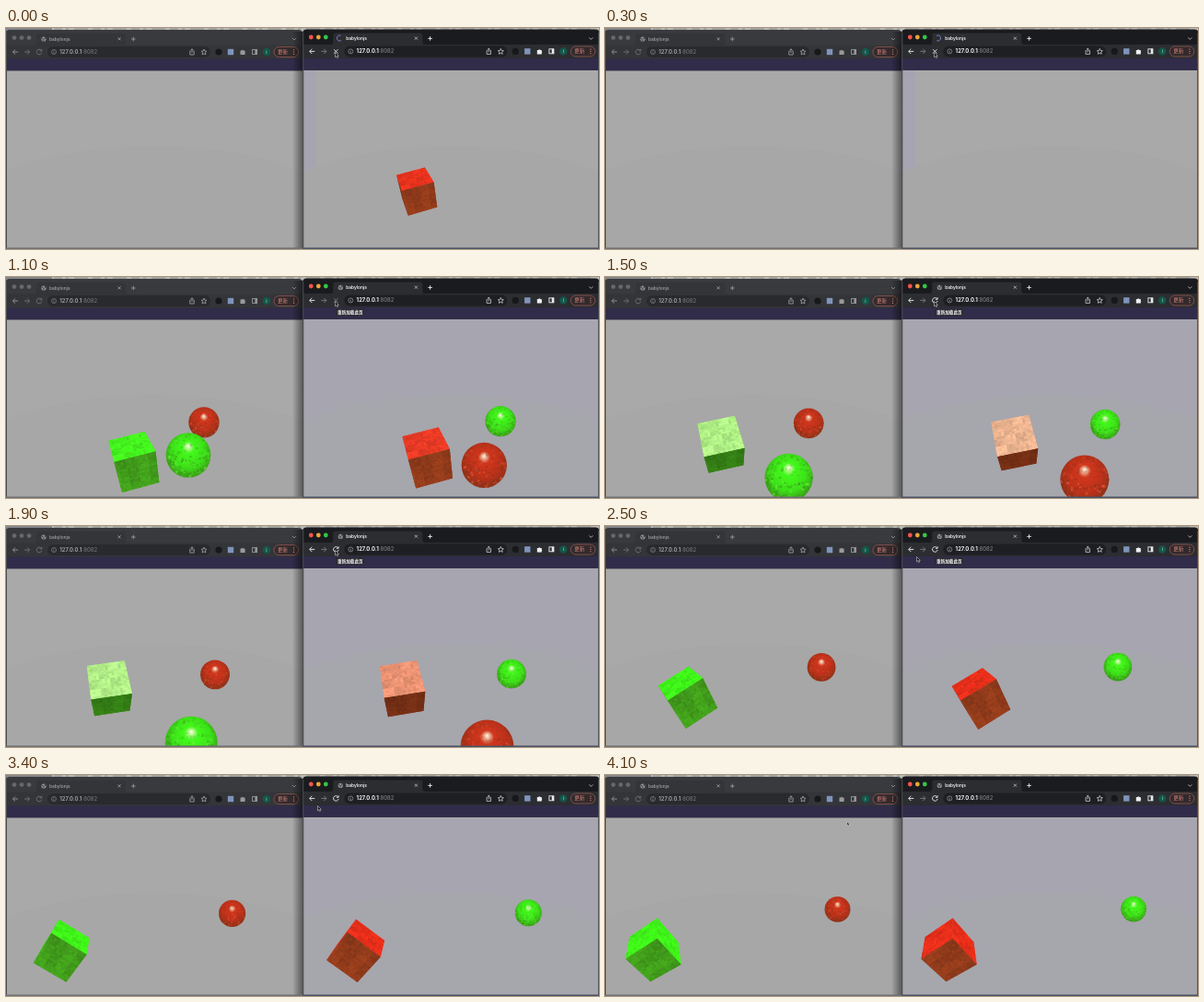
Write an HTML page with a canvas that moves like this. It is 644 by 240 pixels and loops after 4.2 s.

```html
<!DOCTYPE html>
<html lang="zh">
<head>
<meta charset="utf-8">
<title>babylonjs</title>
<style>
html, body { margin: 0; width: 100%; height: 100%; overflow: hidden; background: #a9a9a9; }
canvas, svg { position: absolute; left: 0; top: 0; width: 644px; height: 240px; display: block; }
text { font-family: Inter, "Noto Sans CJK SC", "Noto Sans CJK", sans-serif; }
.hide { display: none; }
</style>
</head>
<body>
<canvas id="scene" width="644" height="240"></canvas>
<svg id="ui" viewBox="0 0 644 240"></svg>
<script>
const LOOP = 4200, STEP = 100;
const $ = id => document.getElementById(id);
const ctx = $('scene').getContext('2d');

// ---------- browser windows ----------
const reload = '<path d="M38.3 24.3A2.8 2.8 0 1 0 38.8 26.6M38.8 22.8V24.9H36.6"/>';

function browser(dx, dy, on) {
  const fg = on ? '#eceef0' : '#98999b', dim = on ? '#7d7f82' : '#727376';
  const icon = on ? '#b9bbbe' : '#98999b';
  const bar = on ? '#2c2d30' : '#343539', strip = on ? '#1a1b1e' : '#393a3e';
  const pill = on ? '#1e1f22' : '#292a2d';
  const lights = on ? ['#f4544d', '#e9a63a', '#35c64a'] : Array(3).fill('#67686b');
  const button = on
    ? `<g id="stop"><path d="M33.8 23.8L38.2 28.2M38.2 23.8L33.8 28.2"/></g><g id="again" stroke="${fg}">${reload}</g>`
    : `<g stroke="${dim}">${reload}</g>`;
  const globe = `<g${on ? ' id="globe"' : ''}><circle cx="41" cy="12" r="2.6" fill="#8f9194"/>
    <path d="M39 11.2L41.2 12.4L40.6 14M42.3 10L42.6 12" stroke="${bar}"/></g>`;
  return `<g transform="translate(${dx} ${dy})" fill="none" stroke-width=".9">
    <path d="M0 46.3V6Q0 2 4 2H318Q322 2 322 6V46.3Z" fill="${strip}"/>
    <path d="M31 19Q33 18 33 15V8Q33 6 36 6H127Q130 6 130 8V15Q130 18 132 19Z" fill="${bar}"/>
    <rect y="18.5" width="322" height="15.5" fill="${bar}"/>
    <rect x="45" y="20" width="177" height="12" rx="6" fill="${pill}"/>
    <rect y="33.5" width="322" height="12.8" fill="#302c49"/>
    ${lights.map((c, i) => `<circle cx="${9 + 8 * i}" cy="10.6" r="2.4" fill="${c}"/>`).join('')}
    ${globe}
    <text x="47" y="13.7" font-size="4.8" font-weight="600" fill="${fg}">babylonjs</text>
    <g stroke="${icon}">
      <path d="M121.6 10.3L124.6 13.3M124.6 10.3L121.6 13.3M311 11L313 13L315 11"/>
      <path d="M136 12H140.6M138.3 9.7V14.3M13 26H7.5M10 23.4L7.4 26L10 28.6" stroke="${fg}"/>
      <path d="M20 26H25.5M23 23.4L25.6 26L23 28.6" stroke="${dim}"/>
      ${button}
      <circle cx="52" cy="26" r="2.5" stroke="${dim}"/><path d="M52 25.6V27.6M52 24.2V24.9" stroke="${dim}"/>
      <path d="M200.8 25H199.8V29H204.2V25H203.2M202 27V22.8M200.7 24L202 22.7L203.3 24"/>
      <path d="M215 23L215.9 25.1L218 25.3L216.4 26.7L216.9 28.9L215 27.8L213.1 28.9L213.6 26.7L212 25.3L214.1 25.1Z"/>
      <rect x="267.6" y="23.4" width="5" height="5" stroke="${fg}"/>
    </g>
    <path d="M270.4 23.4H272.6V28.4H270.4ZM254.5 24.5H256A1.1 1.1 0 0 1 258 24.5H259.5V26A1.1 1.1 0 0 1 259.5 27.6V29H254.5Z" fill="${fg}"/>
    <circle cx="231" cy="26" r="3.6" fill="#17181a"/>
    <rect x="240.8" y="22.8" width="6.4" height="6.4" fill="#7f94bb"/>
    <circle cx="283" cy="26" r="4.2" fill="#12584a"/>
    <text x="283" y="28" font-size="5.4" text-anchor="middle" fill="#cfe5dd">i</text>
    <rect x="291" y="20.6" width="26.5" height="11" rx="5.5" fill="#332a2c" stroke="#935a52" stroke-width=".8"/>
    <text x="295" y="28.1" font-size="5.5" fill="#d8857c">更新</text>
    <path d="M312.6 23.2V24.3M312.6 25.5V26.6M312.6 27.8V28.9" stroke="#d8857c" stroke-width="1.1"/>
    <text x="58.3" y="28" font-size="5.9" font-weight="700" fill="${fg}">127.0.0.1<tspan font-weight="500" fill="${dim}">:8082</tspan></text>
  </g>`;
}

$('ui').innerHTML = `
  <defs><linearGradient id="shade"><stop stop-opacity="0"/><stop offset="1" stop-opacity=".5"/></linearGradient></defs>
  <rect width="644" height="3" fill="#b9bab4"/>
  <rect width="50" height="3" fill="#85868a"/>
  <path d="M52 1H640" stroke="#7d7e7c" stroke-width=".8" stroke-dasharray="9 4 3 6 15 5"/>
  ${browser(0, 0, false)}
  <rect x="311" y="4" width="12" height="236" fill="url(#shade)"/>
  ${browser(322.3, -.6, true)}
  <path d="M.5 3V240M322.8 5V240M643.6 5V240" stroke="#4b4c50"/>
  <path d="M0 239.3H322" stroke="#6e6f72" stroke-width="1.4"/>
  <path d="M322 239.3H644" stroke="#4a5263" stroke-width="1.4"/>
  <path id="spin" d="M363.6 8.3A3 3 0 1 0 364 13.6" fill="none" stroke="#7580c4"/>
  <g id="tip"><rect x="358" y="34.2" width="31" height="8" rx="1" fill="#2c2b33"/>
    <text x="360" y="40" font-size="4.6" font-weight="700" fill="#fff">重新加载此页</text></g>
  <path id="mouse" d="M0 0V6.2L1.5 4.9L2.6 7.2L3.6 6.7L2.6 4.5H4.5Z" fill="#111" stroke="#e8e8e8" stroke-width=".6"/>`;

// ---------- helpers ----------
const clamp = v => Math.min(1, Math.max(0, v));
const ease = (t, a, b) => { const u = clamp((t - a) / (b - a)); return u * u * (3 - 2 * u); };
const bump = (t, mid, width) => Math.exp(-(((t - mid) / width) ** 2));
const mix = (a, b, k) => a.map((v, i) => v + (b[i] - v) * k);
const rgb = (c, m = 1) => `rgb(${c.map(v => Math.min(255, Math.round(v * m)))})`;
const dot = (a, b) => a[0] * b[0] + a[1] * b[1] + a[2] * b[2];
const hash = (a, b = 0) => {
  const s = Math.sin(a * 127.1 + b * 311.7) * 43758.5453;
  return s - Math.floor(s);
};

// ---------- motion, in seconds ----------
// The cube falls, bounces once, then tumbles away to the left
const cubeAt = t => ({
  x: 152 - 99 * ease(t, .2, 4.1),
  y: Math.min(124 + 63 * t * t, 190 - 13 * bump(t, 1.9, .6) + 14 * Math.exp((1.1 - t) / .15)),
  size: 40 + 3 * clamp(1.5 - t),
  tilt: 28 + 38 * bump(t, 1.7, .5) - 6 * ease(t, 3.4, 4.1),
  turn: 6 + 24 * ease(t, 3.4, 4.1),
  spin: -14 + 12 * ease(t, .68, .78) - 9 * ease(t, .8, 1.05) + 8 * ease(t, 1.1, 1.9)
    - 27 * ease(t, 1.9, 2.5) + 88 * ease(t, 2.45, 3.9)
});
// The near ball drops and rolls out below the view
const nearAt = t => ({
  x: 198 + 4 * Math.max(0, t - 1.1),
  y: Math.min(110 + 69 * t * t, 214 + 43 * (t - 1.2) ** 2),
  r: 22.3 + 1.7 * t * t
});
// The far ball rolls off with dying bounces
const farAt = t => ({
  x: 196 + 18.5 * t - 1.15 * t * t,
  y: 169 - 5.6 * t + 20 * Math.exp(-t) * Math.cos(4.8 * (t - .6)),
  r: 17.7 - .92 * t
});

const GREEN = { hi: [64, 246, 26], lo: [66, 158, 28] };
const RED = { hi: [232, 48, 28], lo: [146, 60, 28] };
const pages = [
  { left: 0, shift: 0, ahead: 0, main: GREEN, other: RED },
  { left: 323, shift: 321, ahead: .07, main: RED, other: GREEN }
];
const oldCube = { x: 125, y: 177, size: 32.5, tilt: 35, turn: 8, spin: -11 };

// ---------- drawing ----------
function poly(pts, color) {
  ctx.fillStyle = color;
  ctx.beginPath();
  for (const p of pts) ctx.lineTo(p[0], p[1]);
  ctx.fill();
}

function rotation(...degrees) {
  const [p, w, r] = degrees.map(d => d * Math.PI / 180);
  const { sin, cos } = Math;
  const x = [cos(w), 0, -sin(w)], y = [-sin(p) * sin(w), cos(p), -sin(p) * cos(w)];
  const X = x.map((v, i) => v * cos(r) - y[i] * sin(r));
  const Y = x.map((v, i) => v * sin(r) + y[i] * cos(r));
  return [X, Y, [X[1] * Y[2] - X[2] * Y[1], X[2] * Y[0] - X[0] * Y[2], X[0] * Y[1] - X[1] * Y[0]]];
}

function drawCube({ x, y, size, tilt, turn, spin }, tint) {
  const [X, Y, Z] = rotation(tilt, turn, spin), N = 15;
  const project = p => {
    const f = size * 240 / (240 + size * dot(Z, p));
    return [x + dot(X, p) * f, y + dot(Y, p) * f];
  };
  for (let i = 0; i < 3; i++) {
    const s = Z[i] > 0 ? -1 : 1, ny = Y[i] * s, nz = Z[i] * s;
    const at = (u, v) => {
      const p = [0, 0, 0];
      p[i] = s / 2; p[(i + 1) % 3] = u - .5; p[(i + 2) % 3] = v - .5;
      return project(p);
    };
    // skip faces that perspective turns away
    const o = at(0, 0), a = at(1, 0), b = at(0, 1);
    const area = (a[0] - o[0]) * (b[1] - o[1]) - (a[1] - o[1]) * (b[0] - o[0]);
    if (area * s > 0) continue;
    const shine = Math.pow(clamp(-.4 * ny - .92 * nz), 22) * clamp(-ny * 4);
    const base = mix(mix(tint.lo, tint.hi, clamp(-ny * 2.2)), [240, 238, 195], shine * .7);
    const light = ny > .7 ? .8 : 1;
    poly([o, a, at(1, 1), b], rgb(base, light));
    for (let u = 0; u < N; u++) for (let v = 0; v < N; v++) {
      const n = light * (.87 + .14 * hash(u + 17 * i, v) + .12 * hash((u >> 2) + 5 * i, (v >> 2) + 40));
      const q = (a, b) => at(a / N, b / N);
      poly([q(u, v), q(u + 1, v), q(u + 1, v + 1), q(u, v + 1)], rgb(base, n));
    }
  }
}

function drawBall({ x, y, r }, tint, t) {
  const g = ctx.createRadialGradient(x, y - r * .42, 0, x, y - r * .1, r * 1.1);
  const body = mix(tint.lo, tint.hi, tint === RED ? .65 : .95);
  g.addColorStop(0, '#fffbe8');
  g.addColorStop(.1, rgb(mix(body, [255, 250, 220], .6)));
  g.addColorStop(.24, rgb(body, 1.03));
  g.addColorStop(.68, rgb(body, .93));
  g.addColorStop(1, rgb(mix(body, tint.lo, .75), .88));
  ctx.fillStyle = g;
  ctx.beginPath();
  ctx.arc(x, y, r, 0, 7);
  ctx.fill();
  const c = Math.cos(t * 1.5), s = Math.sin(t * 1.5);
  for (let i = 0; i < 420; i++) {
    const h = hash(i, 3) * 2 - 1, a = hash(i, 9) * 6.283, w = Math.sqrt(1 - h * h);
    const px = w * Math.cos(a), q = w * Math.sin(a), py = h * c - q * s, pz = h * s + q * c;
    if (pz < .3) continue;
    const d = r * .035 * (.6 + hash(i, 5));
    ctx.fillStyle = i % 3 ? rgb(tint.lo, .85) : rgb(mix(tint.hi, [255, 240, 170], .3));
    ctx.globalAlpha = py > 0 ? .4 : .2;
    ctx.fillRect(x + px * r - d, y + py * r - d, d * 2, d * 2);
  }
  ctx.globalAlpha = 1;
}

function drawPage({ left, shift, ahead, main, other }, t) {
  const lilac = left && t >= .5, now = t + ahead;
  ctx.save();
  ctx.beginPath();
  ctx.rect(left, 44, 322, 196);
  ctx.clip();
  ctx.fillStyle = lilac ? '#a7a6b0' : '#a9a9a9';
  ctx.fillRect(left, 0, 322, 240);
  if (left && !lilac) {
    ctx.fillStyle = '#a6a4b1';
    ctx.fillRect(left, 0, 14, 240);
  }
  ctx.fillStyle = lilac ? '#a6a6ad' : '#a7a7a7';
  ctx.beginPath();
  ctx.ellipse(left + 160, 216, 220, 88, 0, 0, 7);
  ctx.fill();
  ctx.translate(shift, 0);
  if (t >= .4) {
    drawCube(cubeAt(now), main);
    drawBall(farAt(now), other, t);
    drawBall(nearAt(now), main, t);
  } else if (left && t < .3) {
    drawCube(oldCube, main);
  }
  ctx.restore();
}

const show = (id, on) => $(id).classList.toggle('hide', !on);

function render(ms) {
  const t = Math.floor(ms % LOOP / STEP) * STEP / 1000;
  pages.forEach(p => drawPage(p, t));
  show('spin', t < .4);
  show('globe', t >= .4);
  show('tip', t >= .5 && t < 2.7);
  show('stop', t < 1.4);
  show('again', t >= 1.4);
  $('stop').setAttribute('stroke', t < .4 ? '#eceef0' : '#7d7f82');
  $('spin').setAttribute('transform', `rotate(${t * 600} 362 11)`);
  const aside = ease(t, 2.1, 2.4), away = ease(t, 3.6, 4.1);
  const x = 357.5 - 19 * aside - 75.5 * away, y = 26.5 + 7 * aside + 17.5 * away;
  $('mouse').setAttribute('transform', `translate(${x} ${y}) scale(${.85 - .25 * away})`);
}

const start = performance.now();
function tick() {
  render(performance.now() - start);
  requestAnimationFrame(tick);
}
tick();
</script>
</body>
</html>
```
